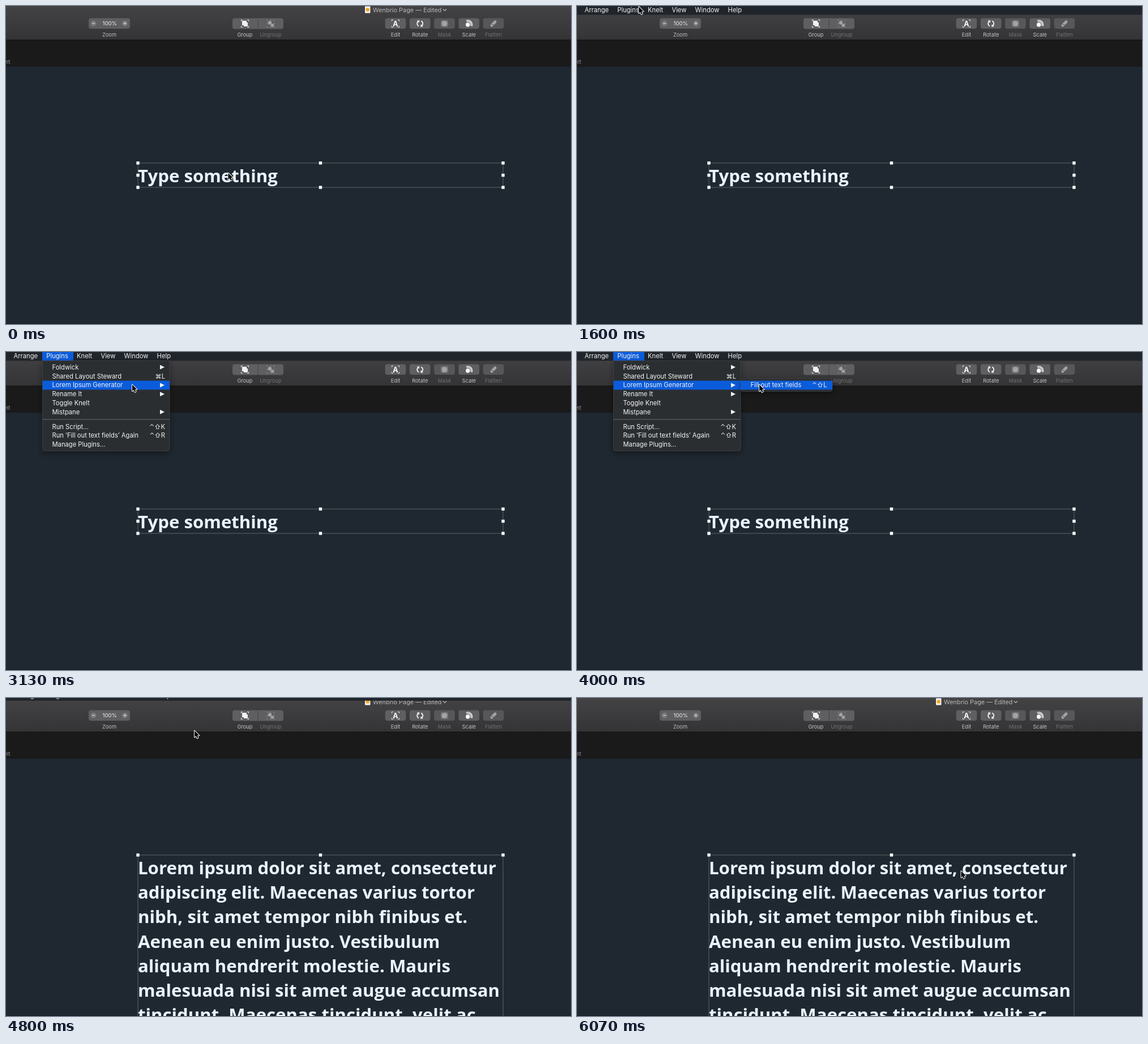
Animation, 998 px wide and 561 px high, one loop 6140 ms. Source, as an HTML page with a canvas:

```html
<!DOCTYPE html>
<html lang="en">
<head>
<meta charset="utf-8">
<title>Filling a text field from a menu</title>
<style>
html, body { margin: 0; width: 100%; height: 100%; overflow: hidden; background: #1f2730; }
canvas { display: block; }
</style>
</head>
<body>
<canvas id="stage" width="998" height="561"></canvas>
<script>
const ctx = document.getElementById('stage').getContext('2d');
const LOOP = 6140, STEP = 200 / 3;
const UI = 'Inter, "DejaVu Sans", sans-serif';
const HEADING = '700 31.2px "Open Sans", sans-serif';
const BLUE = '#0b5cdb', LIGHT = '#e9f4ff', BUTTON = '#5f5e60', DIM = '#a3a2a4', MENU_TEXT = '#f4f4f4';
const ROW = 15.8, ROW_TOP = 19;
const MENU_OPEN = 2070, SUB_OPEN = 3190, CLICK = 4390, FADE = 4480, FADE_END = 4690, FILL = 4730;
const CIRCLE_START = 5670, CIRCLE_END = 6060;

const LOREM = [
  'Lorem ipsum dolor sit amet, consectetur',
  'adipiscing elit. Maecenas varius tortor',
  'nibh, sit amet tempor nibh finibus et.',
  'Aenean eu enim justo. Vestibulum',
  'aliquam hendrerit molestie. Mauris',
  'malesuada nisi sit amet augue accumsan',
  'tincidunt. Maecenas tincidunt, velit ac'
];
const BAR_ITEMS = ['Arrange', 'Plugins', 'Knelt', 'View', 'Window', 'Help'];
const MENU = [
  ['Foldwick', '>'], ['Shared Layout Steward', '⌘L'], ['Lorem Ipsum Generator', '>'],
  ['Rename It', '>'], ['Toggle Knelt', ''], ['Mistpane', '>'],
  ['Run Script…', '⌃⇧K'], ['Run ‘Fill out text fields’ Again', '⌃⇧R'], ['Manage Plugins…', '']
];
const MOVES = [
  { from: 0, to: 730, x: 204, y: 0 },
  { from: 1330, to: 1800, x: 48, y: 1 },
  { from: 1800, to: 2250, x: 99, y: 3 },
  { from: 2400, to: 3200, x: 225, y: 58 },
  { from: 3470, to: 4130, x: 332.5, y: 57 },
  { from: 5000, to: CIRCLE_START, x: 508, y: 260 }
];

const clamp = v => Math.max(0, Math.min(1, v));
const mix = (a, b, p) => a + (b - a) * p;
const easeOut = p => 1 - (1 - p) ** 2;
const smooth = p => p * p * (3 - 2 * p);

function pointerAt(t) {
  if (t > CIRCLE_START) {
    // One sweep around the text, drifting downwards
    const p = clamp((t - CIRCLE_START) / (CIRCLE_END - CIRCLE_START));
    const angle = mix(4.24, -1.174, p);
    return { x: 600 + 202 * Math.cos(angle), y: 342 + 92.6 * Math.sin(angle) + 48 * p };
  }
  const pos = { x: 392, y: 294 };
  for (const move of MOVES) {
    const p = smooth(clamp((t - move.from) / (move.to - move.from)));
    pos.x = mix(pos.x, move.x, p);
    pos.y = mix(pos.y, move.y, p);
  }
  return pos;
}

function rect(x, y, w, h, color) {
  ctx.fillStyle = color;
  ctx.fillRect(x, y, w, h);
}

function square(x, y, r, color) {
  rect(x - r, y - r, 2 * r, 2 * r, color);
}

function rounded(x, y, w, h, r, color) {
  ctx.fillStyle = color;
  ctx.beginPath();
  ctx.roundRect(x, y, w, h, r);
  ctx.fill();
}

function disc(x, y, r, color) {
  ctx.fillStyle = color;
  ctx.beginPath();
  ctx.arc(x, y, r, 0, 7);
  ctx.fill();
}

function arc(x, y, r, from, to, color, width) {
  ctx.beginPath();
  ctx.arc(x, y, r, from, to);
  ctx.strokeStyle = color;
  ctx.lineWidth = width;
  ctx.stroke();
}

function line(points, color, width) {
  ctx.beginPath();
  for (const [x, y] of points) ctx.lineTo(x, y);
  ctx.strokeStyle = color;
  ctx.lineWidth = width;
  ctx.stroke();
}

function polygon(points, fill, outline) {
  ctx.beginPath();
  for (const [x, y] of points) ctx.lineTo(x, y);
  ctx.closePath();
  if (outline) {
    ctx.strokeStyle = outline;
    ctx.lineWidth = 2;
    ctx.stroke();
  }
  ctx.fillStyle = fill;
  ctx.fill();
}

function text(str, x, y, size, color, align = 'left', weight = 400) {
  ctx.font = `${weight} ${size}px ${UI}`;
  ctx.textAlign = align;
  ctx.fillStyle = color;
  ctx.fillText(str, x, y);
}

function corners(r, arm, color) {
  for (const sx of [-r, r]) for (const sy of [-r, r]) {
    line([[sx * (1 - arm), sy], [sx, sy], [sx, sy * (1 - arm)]], color, 1.1);
  }
}

// Each icon is drawn around the origin
const ICONS = {
  Group() {
    square(-1, -1, 4, '#f2f2f2');
    square(1.5, 1.5, 3.5, '#f2f2f2');
    corners(6.5, 0.4, '#dcdcdc');
  },
  Ungroup() {
    disc(-1.5, -1.5, 3.2, DIM);
    disc(3, 3, 2.8, DIM);
    for (const x of [-6, 0, 6]) for (const y of [-6, 0, 6]) if (x || y) square(x, y, 0.7, DIM);
  },
  Edit() {
    text('A', 0, 4.6, 12.5, '#fff', 'center', 700);
    corners(6.5, 0.4, '#d8d8d8');
  },
  Rotate() {
    for (let i = 0; i < 2; i++) {
      arc(0, 0, 5, 2, 4, '#fff', 1.7);
      polygon([[-5.5, -5.5], [-0.8, -5.5], [-1.8, -1.2]], '#fff');
      ctx.rotate(Math.PI);
    }
  },
  Mask() {
    rounded(-6.5, -6, 13, 12, 2, '#737274');
    disc(0, 0, 4.8, DIM);
  },
  Scale() {
    disc(-2, 2, 3.7, '#fff');
    for (const r of [5.5, 7.6]) arc(-1.8, 1.8, r, -2, 0.4, '#fff', 1.3);
  },
  Flatten() {
    ctx.lineCap = 'round';
    line([[-3, 3], [3, -3]], DIM, 5);
    ctx.lineCap = 'butt';
    line([[-4, 1], [2, 3]], BUTTON, 1);
  }
};

function tool(name, x, dim) {
  ctx.save();
  ctx.translate(x, 31);
  ICONS[name]();
  ctx.restore();
  text(name, x, 54, 9.3, dim ? '#727173' : '#c4c3c5', 'center');
}

function drawWindow() {
  const chrome = ctx.createLinearGradient(0, 0, 0, 60);
  chrome.addColorStop(0, '#434244');
  chrome.addColorStop(1, '#343335');
  rect(0, 0, 998, 561, '#1f2730');
  rect(0, 0, 998, 60, chrome);
  rect(0, 60, 998, 47, '#1a1a1b');
  rect(0, 59.5, 998, 1, '#0d0d0d');
  rect(0, 560, 998, 1, '#141a20');
  text('elt', 7.5, 102, 9.3, '#8d8d8e', 'right');

  rounded(634, 0.5, 9.5, 12, 1, '#f4f4f4');
  disc(638.7, 6.5, 3.2, '#f6a623');
  text('Wenbrio Page — Edited', 648, 10.8, 10.9, '#b8b7b9');
  line([[772, 5.5], [775, 8.5], [778, 5.5]], '#b8b7b9', 1.2);

  rounded(146, 21.5, 73, 18.5, 4, BUTTON);
  for (const x of [154.5, 210]) {
    disc(x, 30.7, 5, '#79787a');
    rect(x - 2.5, 30.2, 5, 1, '#e6e6e6');
  }
  rect(209.5, 28.2, 1, 5, '#e6e6e6');
  text('100%', 183.3, 34.2, 9.6, '#f2f2f2', 'center');
  text('Zoom', 182.5, 54, 9.3, '#bdbcbe', 'center');

  rounded(400, 21.5, 90, 19, 4, BUTTON);
  rect(444.7, 21.5, 1, 19, '#454446');
  tool('Group', 422);
  tool('Ungroup', 467.5, true);
  ['Edit', 'Rotate', 'Mask', 'Scale', 'Flatten'].forEach((name, i) => {
    const x = 688 + i * 43.25, dim = name === 'Mask' || name === 'Flatten';
    rounded(x - 18.3, 21.5, 36.6, 18.5, 4, dim ? '#575658' : BUTTON);
    tool(name, x, dim);
  });
}

function drawTextLayer(filled) {
  const lines = filled ? LOREM : ['Type something'];
  const left = 233, top = 277, width = 645, height = filled ? 900 : 43;
  ctx.strokeStyle = '#5d646b';
  ctx.lineWidth = 1;
  ctx.strokeRect(left, top, width, height);
  ctx.font = HEADING;
  ctx.textAlign = 'left';
  ctx.fillStyle = LIGHT;
  lines.forEach((str, i) => ctx.fillText(str, left, 311 + i * 43.2));
  for (const u of [0, 0.5, 1]) for (const v of [0, 0.5, 1]) {
    if (u !== 0.5 || v !== 0.5) square(left + u * width, top + v * height, 2.7, '#fff');
  }
}

function drawBar(t) {
  const shown = easeOut(clamp((t - 1065) / 270)) - easeOut(clamp((t - 4670) / 290));
  if (shown <= 0) return;
  ctx.save();
  ctx.translate(0, (shown - 1) * 15.5);
  rect(0, 0, 998, 15.5, '#20252b');
  if (t >= MENU_OPEN && t < FADE_END) rect(64, 0, 55, 15.5, BLUE);
  let x = 13.5;
  for (const name of BAR_ITEMS) {
    text(name, x, 10.8, 11.2, MENU_TEXT);
    x += ctx.measureText(name).width + 15.2;
  }
  ctx.restore();
}

function panel(x, y, w, h, radii) {
  ctx.save();
  ctx.shadowColor = 'rgba(0,0,0,.4)';
  ctx.shadowBlur = 12;
  ctx.shadowOffsetY = 4;
  rounded(x, y, w, h, radii, '#2b2e31');
  ctx.restore();
  ctx.strokeStyle = '#45484b';
  ctx.lineWidth = 0.7;
  ctx.stroke();
}

function drawMenu(t, pointer) {
  if (t < MENU_OPEN || t >= FADE_END) return;
  ctx.save();
  ctx.globalAlpha = 1 - clamp((t - FADE) / (FADE_END - FADE));
  panel(64.5, 15.5, 224.5, 159, [0, 0, 4, 4]);
  const active = Math.floor((pointer.y - ROW_TOP) / ROW);
  if (active >= 0) rect(64.5, ROW_TOP + active * ROW, 224.5, ROW, BLUE);
  rect(64.5, 118, 224.5, 1.6, '#515457');
  MENU.forEach(([label, key], i) => {
    const mid = 26.8 + i * ROW + (i > 5 ? 9.9 : 0);
    text(label, 81.5, mid + 4, 11.2, MENU_TEXT);
    if (key === '>') polygon([[272, mid - 4], [280, mid], [272, mid + 4]], MENU_TEXT);
    else text(key, 281, mid + 4, 11.2, MENU_TEXT, 'right');
  });
  if (t >= SUB_OPEN) {
    panel(289, 47, 162, 22.5, 4);
    const blink = t >= CLICK && t < CLICK + 60;
    if (pointer.x > 289 && !blink) rect(289, ROW_TOP + 2 * ROW, 162, ROW, BLUE);
    text('Fill out text fields', 306.5, 62.4, 11.2, MENU_TEXT);
    text('⌃⇧L', 441.5, 62.4, 11.2, MENU_TEXT, 'right');
  }
  ctx.restore();
}

function drawPointer(t, { x, y }) {
  ctx.save();
  ctx.translate(x, y);
  ctx.lineJoin = 'round';
  const resizing = t > 700 && t < 1130;
  if (resizing) polygon([[-3.2, 0], [4.2, 0], [0.5, 3.8]], '#000', '#fff');
  else polygon([[0.5, 0.7], [0.5, 12.2], [3.1, 9.8], [5, 14], [7, 13.1], [5.2, 9.1], [8.8, 9]], '#000', '#fff');
  ctx.restore();
}

const start = performance.now();

function frame(now) {
  const elapsed = Math.max(0, now - start) % LOOP;
  const t = Math.floor((elapsed + 4) / STEP) * STEP;
  const pointer = pointerAt(t);
  drawWindow();
  drawTextLayer(t >= FILL);
  drawBar(t);
  drawMenu(t, pointer);
  drawPointer(t, pointer);
  requestAnimationFrame(frame);
}
requestAnimationFrame(frame);
</script>
</body>
</html>
```
